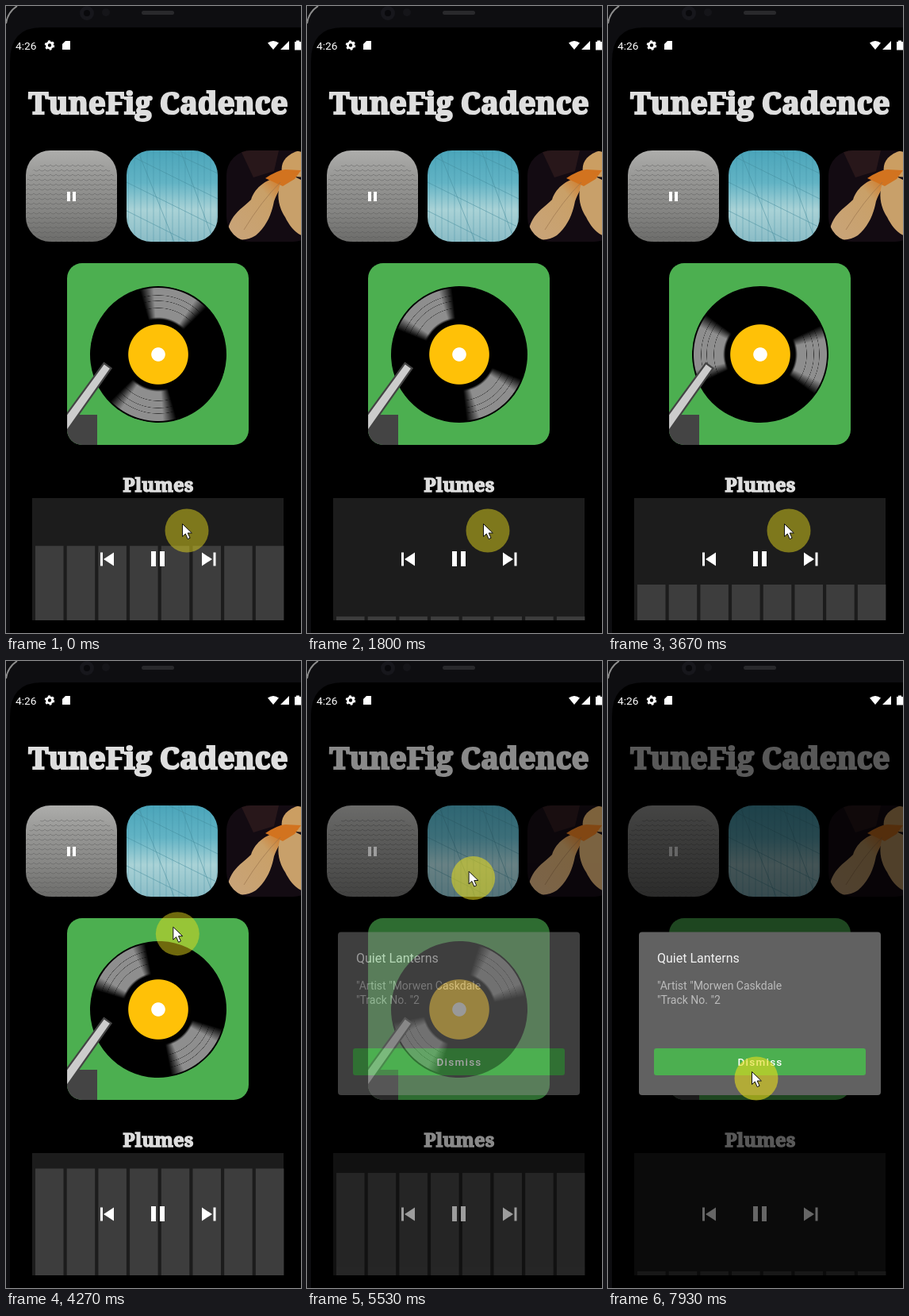
These frames come from a looping animation (372 by 790 pixels, 8 s). An HTML page:

```html
<!DOCTYPE html>
<html lang="en">
<head>
<meta charset="utf-8">
<title>Music player</title>
<style>
html, body { margin: 0; width: 100%; height: 100%; overflow: hidden; background: #000; }
svg { position: absolute; left: 0; top: 0; width: 372px; height: 790px; }
text { font-family: Roboto, sans-serif; }
.slab { font-family: "Noto Serif", serif; font-weight: 700; fill: #dedede; stroke: #dedede; text-anchor: middle; }
#record {
  position: absolute; left: 106px; top: 353px; width: 172px; height: 172px; border-radius: 50%;
  background:
    radial-gradient(circle, #fff 8.3px, #ffc107 9.2px 37.3px, #000 38.3px 44px, #0000 47px 58px,
      #0009 58.5px, #0000 59px 67px, #0009 67.5px, #0000 68px 74px, #0009 74.5px, #0000 75px 83.5px, #000 84.5px),
    conic-gradient(#8e8e8e 19deg, #000 31deg 149deg, #8e8e8e 161deg 199deg, #000 211deg 329deg, #8e8e8e 341deg);
}
</style>
</head>
<body>
<svg viewBox="0 0 372 790">
  <defs>
    <linearGradient id="scales" x2="0" y2="1">
      <stop stop-color="#adadab"/><stop offset=".3" stop-color="#979795"/>
      <stop offset=".65" stop-color="#868684"/><stop offset="1" stop-color="#6c6c6a"/>
    </linearGradient>
    <linearGradient id="glass" x2="0" y2="1">
      <stop stop-color="#4ba5ba"/><stop offset=".35" stop-color="#62b3c4"/>
      <stop offset=".65" stop-color="#a9d2d6"/><stop offset="1" stop-color="#8abcc6"/>
    </linearGradient>
    <linearGradient id="petal" x1="1" x2="0" y2="1">
      <stop stop-color="#d2741f"/><stop offset=".3" stop-color="#c9a068"/><stop offset="1" stop-color="#c8a47a"/>
    </linearGradient>
    <pattern id="weave" width="7" height="6" patternUnits="userSpaceOnUse">
      <path d="M0 2q3.5 4 7 0" fill="none" stroke="#555" stroke-opacity=".45"/>
    </pattern>
    <pattern id="slats" width="8" height="20" patternUnits="userSpaceOnUse">
      <path d="M2 0V20" stroke="#37879c" stroke-opacity=".35"/>
    </pattern>
    <clipPath id="tile2"><rect x="152" y="182" width="115" height="115" rx="31"/></clipPath>
    <clipPath id="tile3"><rect x="278" y="182" width="115" height="115" rx="31"/></clipPath>
  </defs>
  <rect width="372" height="790"/>
  <text class="slab" x="192" y="136" font-size="38" stroke-width="2.2">TuneFig Cadence</text>

  <rect x="25" y="182" width="115" height="115" rx="31" fill="url(#scales)"/>
  <rect x="25" y="198" width="115" height="99" rx="31" fill="url(#weave)"/>
  <path d="M77 234h4v12h-4zM84 234h4v12h-4z" fill="#fff"/>

  <g clip-path="url(#tile2)">
    <path d="M152 182h115v115H152z" fill="url(#glass)"/>
    <path d="M152 182h115v115H152z" fill="url(#slats)"/>
    <path d="M152 186L267 243M152 222L267 279M152 258L230 297M205 182L267 211M166 182L212 297M220 182L262 297"
      fill="none" stroke="#43899a" stroke-opacity=".5"/>
  </g>

  <g clip-path="url(#tile3)">
    <path d="M278 182h115v115H278z" fill="#130b12"/>
    <path d="M296 182h48l-6 26-26 8z" fill="#28171a"/>
    <path d="M350 215C330 216 314 228 309 244C299 254 284 262 280 281C282 296 302 298 315 289C329 277 335 262 338 246C342 235 348 228 350 215Z" fill="url(#petal)"/>
    <path d="M347 220C340 238 344 254 352 266C358 278 366 288 378 291V222L358 212Z" fill="#c8a06a"/>
    <path d="M349 214C344 198 352 184 380 180V216Z" fill="#cb9e62"/>
    <path d="M327 217Q342 207 352 206L372 207L364 218L349 227Z" fill="#d2731f"/>
    <path d="M346 222Q322 246 300 282" fill="none" stroke="#96714a" stroke-opacity=".6"/>
  </g>

  <rect x="77" y="324" width="229" height="229" rx="19" fill="#4caf50"/>
</svg>

<div id="record"></div>

<svg viewBox="0 0 372 790">
  <defs>
    <clipPath id="card"><rect x="77" y="324" width="229" height="229" rx="19"/></clipPath>
  </defs>
  <g clip-path="url(#card)">
    <path d="M77 515h38v38H77z" fill="#444"/>
    <path d="M123.500 450L132.500 456.500L76 536.500V515Z" fill="#ccc" stroke="#444" stroke-width="2.2"/>
  </g>

  <text class="slab" x="192" y="612" font-size="24" stroke-width="1.4">Plumes</text>
  <path d="M33 620h317v154H33z" fill="#1c1c1c"/>
  <path id="bars" fill="#3d3d3d"/>
  <path d="M119 688.500h3v17h-3zM136 688.500v17L123 697zM183 687h6v19h-6zM194 687h6v19h-6zM247 688.500v17L260 697zM261.500 688.500h3v17h-3z" fill="#fff"/>

  <g id="modal">
    <path d="M5 62H372V790H5z" fill-opacity=".6"/>
    <rect x="39" y="341.500" width="305" height="205.500" rx="4" fill="#616161"/>
    <text x="62" y="380" font-size="16" fill="#f2f2f2">Quiet Lanterns</text>
    <g font-size="14" fill="#bbb">
      <text x="62" y="414">"Artist "Morwen Caskdale</text>
      <text x="62" y="432">"Track No. "2</text>
    </g>
    <rect x="58" y="488" width="267" height="34" rx="3" fill="#4caf50"/>
    <text x="192" y="510" font-size="13.500" font-weight="500" letter-spacing="1.25" text-anchor="middle" fill="#fff">Dismiss</text>
  </g>

  <g>
    <path d="M0 0H372V27H45Q5 27 5 70V790H0Z" fill="#0e0e11"/>
    <path d="M0 22Q2 8 14 0" fill="none" stroke="#8d8d8d" stroke-width="2"/>
    <circle cx="102" cy="9" r="9" fill="#17171c"/>
    <circle cx="102" cy="9" r="4" fill="#09090c"/>
    <circle cx="126" cy="8" r="5" fill="#151519"/>
    <rect x="171" y="6" width="41" height="5" rx="2.500" fill="#29292c"/>
  </g>
  <g fill="#fff">
    <text x="12" y="55" font-size="13.700">4:26</text>
    <circle cx="55" cy="49.500" r="3.600" fill="none" stroke="#fff" stroke-width="2.800"/>
    <circle cx="55" cy="49.500" r="5.400" fill="none" stroke="#fff" stroke-width="1.800" stroke-dasharray="2.800 2.855"/>
    <path d="M75 44h6v11H71V48zM330 46.500Q337 41.500 344 46.500L337 55zM357 44V55H346zM364 45h2v-1.500h4V45h2V55.500h-8z"/>
  </g>

  <g id="cursor">
    <circle id="halo" r="27.500" fill="#e8dc1c"/>
    <path d="M-5.500-8.500v16l3.800-3.500 2.900 6.600 2.900-1.300-2.900-6.300h5.200z" fill="#fff" stroke="#111" stroke-width="1"/>
  </g>
</svg>

<script>
const LOOP = 8000, STEPS = 120;
const $ = id => document.getElementById(id);
const clamp = v => Math.min(1, Math.max(0, v));

// time, x, y of the pointer
const stops = [
  [3680, 228, 661], [4330, 216, 335], [4530, 211, 204], [4800, 210, 271],
  [5300, 210, 271], [6130, 208, 284], [6470, 195, 436], [6900, 191, 458],
  [7800, 191, 458], [7930, 187, 526]
];

function pointer(t) {
  const i = stops.findIndex(s => s[0] > t);
  if (i === 0) return stops[0].slice(1);
  if (i < 0) return stops.at(-1).slice(1);
  const [a, b] = [stops[i - 1], stops[i]];
  const u = (t - a[0]) / (b[0] - a[0]), k = u * u * (3 - 2 * u);
  return [1, 2].map(n => a[n] + (b[n] - a[n]) * k);
}

// soft-edged pulse, symmetric about its peak
function barHeight(t) {
  const period = 1022, peak = 263;
  const phase = (t - peak + period) % period;
  const away = Math.min(phase, period - phase);
  return 3 + 133 / (1 + Math.exp((away - 300) / 48.5));
}

function draw(t) {
  const h = barHeight(t);
  const shown = clamp((t - 5450) / 130);
  $('bars').setAttribute('d', Array.from({ length: 8 }, (_, i) =>
    `M${37 + i * 39.7} 774v${-h}h35.5v${h}z`).join(''));
  $('record').style.transform = `rotate(${15 + t * 0.071}deg)`;
  $('modal').setAttribute('opacity', shown);
  $('cursor').setAttribute('transform', `translate(${pointer(t)})`);
  $('halo').setAttribute('opacity', 0.48 + 0.12 * shown);
}

const start = performance.now();
function tick(now) {
  const t = Math.max(0, now - start) % LOOP;
  const step = Math.floor((t + 4) / LOOP * STEPS) % STEPS;
  draw(step * LOOP / STEPS);
  requestAnimationFrame(tick);
}
draw(0);
requestAnimationFrame(tick);
</script>
</body>
</html>
```
